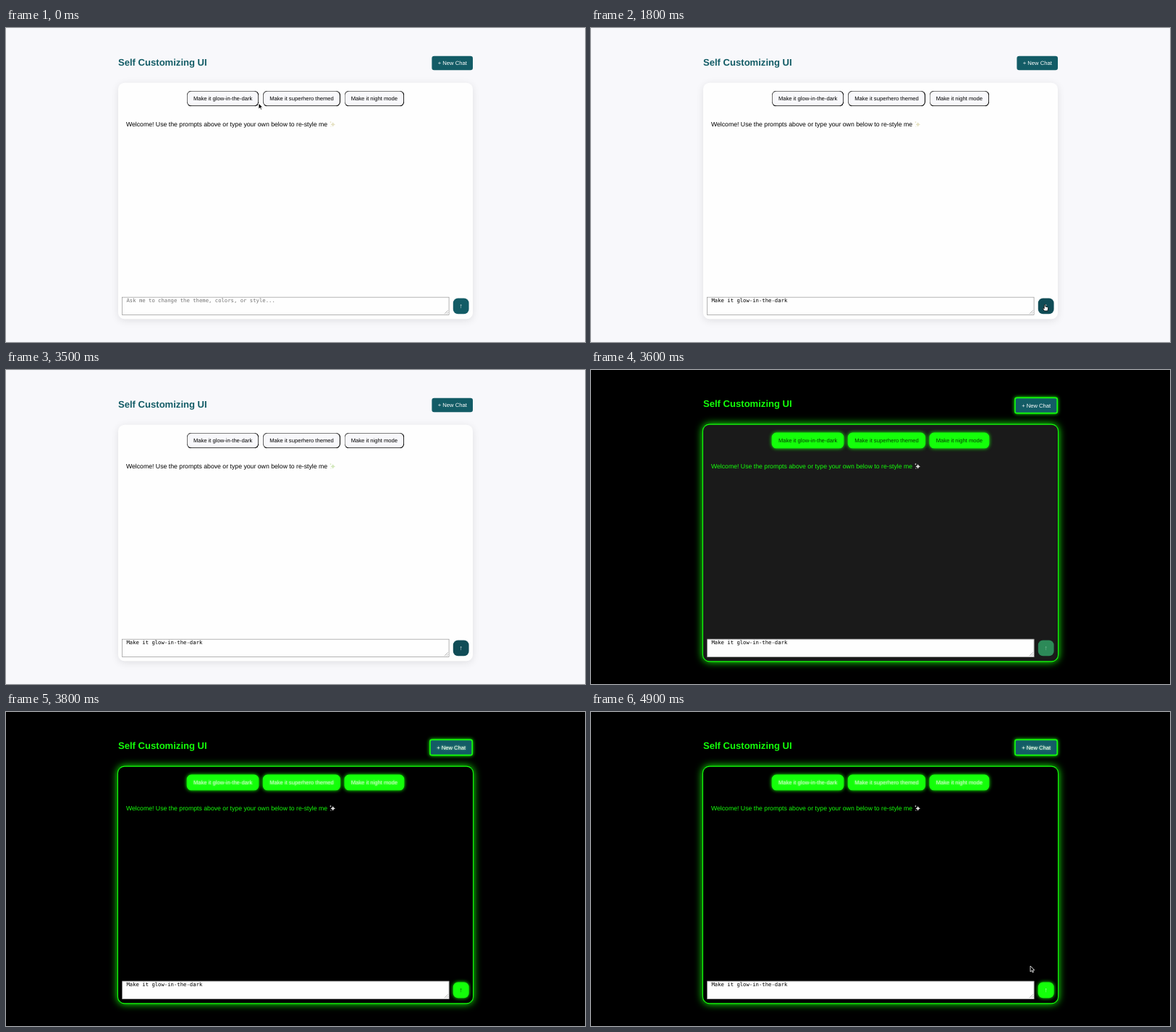
An HTML page for the animation above (5000 ms loop, 800x434 px).

```html
<!DOCTYPE html>
<html lang="en">
<head>
<meta charset="utf-8">
<title>Self Customizing UI</title>
<style>
  html, body { margin: 0; width: 100%; height: 100%; overflow: hidden; }
  body {
    --neon: #14ff0a;
    background: #f8f8fb; color: #000;
    font: 16px/18px "Liberation Sans", Arial, sans-serif;
    text-rendering: geometricPrecision;
  }
  /* 900px wide layout scaled down to the 800 x 434 stage */
  #app {
    position: absolute; left: 155px; top: 0; width: 900px; height: 797px;
    transform: scale(.54444); transform-origin: 0 0;
  }
  #app *, #cursor { position: absolute; box-sizing: border-box; white-space: nowrap; }
  h1 { margin: 0; top: 75px; font-size: 24px; line-height: 28px; color: #135c66; }
  .button { font-size: 14px; line-height: 16px; padding: 10px 15px; }
  #new { right: 0; top: 71px; border-radius: 6px; background: #135c66; color: #fff; }
  #card {
    top: 139px; width: 900px; height: 600px; border-radius: 16px;
    background: #fefefe; box-shadow: 0 4px 20px rgba(0, 0, 0, .1);
  }
  #chips { top: 20px; width: 100%; display: flex; justify-content: center; gap: 10px; }
  #chips .button { position: static; border: 2px outset #000; border-radius: 12px; background: #f8f8fb; }
  #welcome { left: 20px; top: 97px; }
  #spark { left: 536px; top: 97px; width: 17px; height: 18px; fill: var(--spark); }
  #input {
    left: 10px; top: 544px; width: 830px; height: 46px; padding: 2px 10px;
    border: 1px solid #767676; background: #fefefe; color: #000;
    font: 13.333px/16px "DejaVu Sans Mono", monospace;
  }
  #input.empty { color: #757575; }
  #grip { right: 1px; bottom: 1px; width: 11px; height: 11px; stroke: #777; }
  #send {
    left: 850px; top: 547px; width: 40px; height: 40px; border-radius: 12px;
    line-height: 40px; text-align: center; color: #fff;
    background: color-mix(in srgb, #135c66, #104c56 var(--hover));
  }
  .glow { background: #000; color: var(--neon); }
  .glow h1 { color: var(--neon); top: 73px; }
  .glow #card {
    background: color-mix(in srgb, #1a1a1a, #000 var(--fade));
    box-shadow: 0 0 0 2px var(--neon), 0 0 20px 2px var(--neon);
  }
  .glow .button, .glow #chips .button {
    background: var(--neon); border-color: var(--neon); border-style: solid;
    box-shadow: 0 0 10px var(--neon);
    color: color-mix(in srgb, #063a06, #c4ffbe var(--fade));
    text-shadow: 0 0 5px color-mix(in srgb, transparent, #b0ffa8 var(--fade));
  }
  .glow #new { top: 69px; }
  .glow #send {
    background: color-mix(in srgb, #2c8a58, var(--neon) var(--fade));
    box-shadow: 0 0 10px color-mix(in srgb, transparent, var(--neon) var(--fade));
    color: color-mix(in srgb, color-mix(in srgb, #86c4a0, #063a06 var(--fade)), #c4ffbe var(--leave));
  }
  #cursor { left: 0; top: 0; width: 12px; height: 14px; overflow: visible; }
</style>
</head>
<body>
<div id="app">
  <h1>Self Customizing UI</h1>
  <div id="new" class="button">+ New Chat</div>
  <div id="card">
    <div id="chips">
      <div class="button">Make it glow-in-the-dark</div>
      <div class="button">Make it superhero themed</div>
      <div class="button">Make it night mode</div>
    </div>
    <div id="welcome">Welcome! Use the prompts above or type your own below to re-style me</div>
    <svg id="spark" viewBox="0 0 17 18">
      <path d="M9 3q1 5 6 6q-5 1-6 6q-1-5-6-6q5-1 6-6M3 0q0 3 3 3q-3 0-3 3q0-3-3-3q3 0 3-3M4 12q0 2 2 2q-2 0-2 2q0-2-2-2q2 0 2-2"/>
    </svg>
    <div id="input"><span id="value"></span>
      <svg id="grip" viewBox="0 0 11 11"><path d="M1 10 10 1M6 10 10 6"/></svg>
    </div>
    <div id="send">↑</div>
  </div>
</div>
<svg id="cursor"><path id="shape"/></svg>
<script>
const $ = id => document.getElementById(id);
const SHAPES = {
  arrow: { d: 'M0 0V8L1.9 6.3 3.1 9 4.5 8.4 3.3 5.8H5.8Z', fill: '#000', stroke: '#fff' },
  beam: { d: 'M-1.5-3.5Q0-3.5 0-2.5Q0-3.5 1.5-3.5M0-2.5V2.5M-1.5 3.5Q0 3.5 0 2.5Q0 3.5 1.5 3.5', fill: 'none', stroke: '#333' },
  hand: { d: 'M-.8 4V.6Q0-.4.8.6V3L4 3.8Q5 4.2 4.6 6L4 9H-.6L-3 5.6Q-2.6 4.4-.8 6Z', fill: '#fff', stroke: '#000' }
};
// time, x, y, pointer shape from that time on ('' hides it)
const PATH = [
  [0, 349, 104, 'arrow'], [100, 340, 100, 'hand'], [200, 335, 98, 'hand'], [800, 335, 98, 'hand'],
  [900, 403, 143, 'beam'], [1100, 500, 248, 'arrow'], [1400, 619, 369, 'arrow'],
  [1500, 627, 382, 'hand'], [2100, 627, 382, ''],
  [4700, 620, 372, 'arrow'], [4900, 607, 351, 'arrow'], [5000, 607, 351, 'arrow']
];
const ramp = (t, from, to) => Math.min(1, Math.max(0, (t - from) / (to - from)));

function drawCursor(t) {
  const i = PATH.findLastIndex(key => key[0] <= t);
  const [t0, x0, y0, name] = PATH[i], [t1, x1, y1] = PATH[i + 1];
  const p = ramp(t, t0, t1), shape = SHAPES[name];
  $('cursor').style.display = shape ? 'block' : 'none';
  if (!shape) return;
  $('cursor').style.transform = `translate(${x0 + (x1 - x0) * p}px, ${y0 + (y1 - y0) * p}px)`;
  for (const key in shape) $('shape').setAttribute(key, shape[key]);
  $('shape').setAttribute('stroke-width', .8);
}

function frame() {
  const t = Math.floor(performance.now() % 5000 / 100) * 100;
  const set = (name, value) => document.body.style.setProperty(name, value);
  const glow = t >= 3600, filled = t >= 400;
  document.body.className = glow ? 'glow' : '';
  set('--hover', ramp(t, 1400, 1700) * 100 + '%');
  set('--fade', ramp(t, 3600, 3800) * 100 + '%');
  set('--leave', ramp(t, 4600, 4800) * 100 + '%');
  set('--spark', glow ? '#ddd' : t >= 3000 ? '#d3e8bc' : t >= 2400 ? '#e6de98' : '#e6e2c4');
  $('input').className = filled ? '' : 'empty';
  $('value').textContent = filled ? 'Make it glow-in-the-dark' : 'Ask me to change the theme, colors, or style...';
  drawCursor(t);
  requestAnimationFrame(frame);
}
frame();
</script>
</body>
</html>
```
